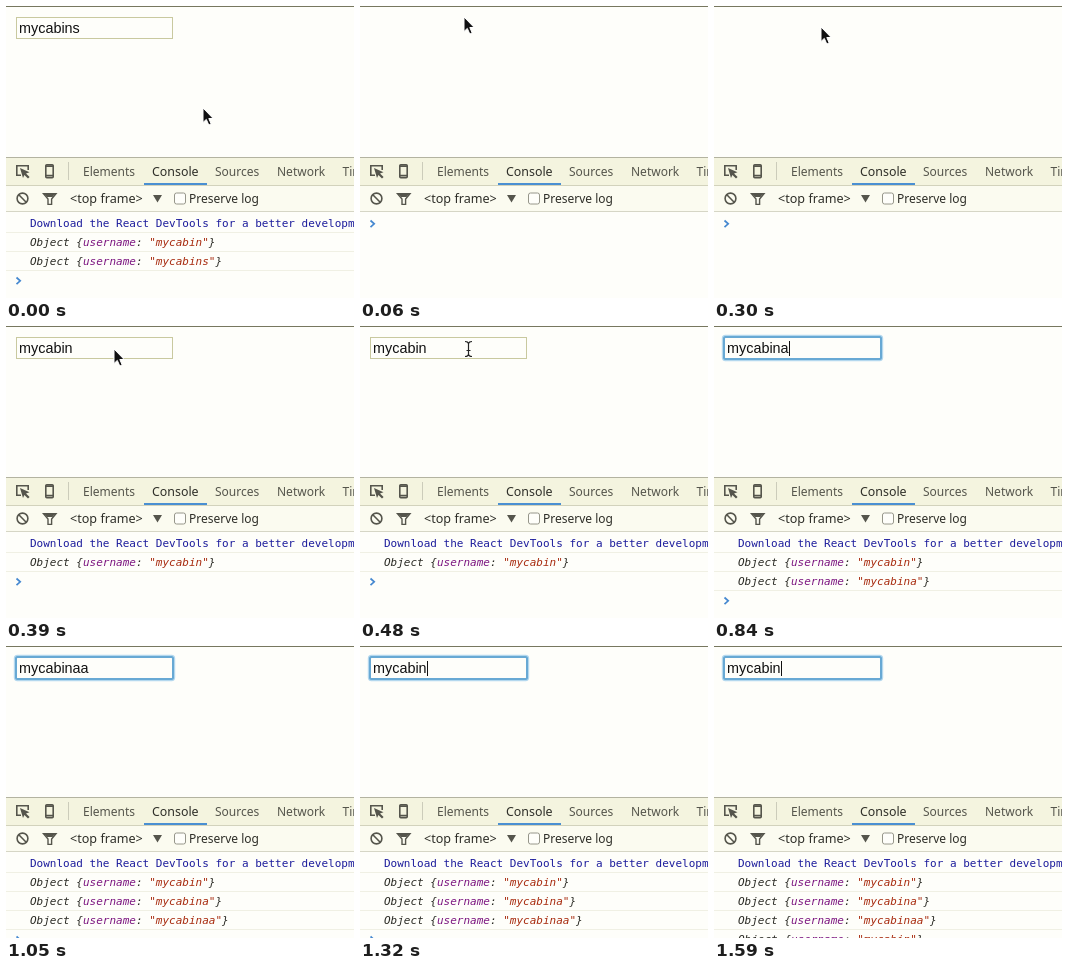
Recreate the animation shown at these times as an HTML page. Size 348 by 292 pixels, loop 1680 ms.

```html
<!DOCTYPE html>
<html lang="en">
<head>
<meta charset="utf-8">
<title>Console demo</title>
<style>
  html, body { margin: 0; width: 100%; height: 100%; overflow: hidden; background: #fefefa; }
  svg { display: block; width: 100vw; height: 100vh; }
  .ui { font: 12px "Noto Sans", "Open Sans", sans-serif; fill: #55554c; }
  .ui .dark { fill: #2e2e28; }
  .log { font: 11px "DejaVu Sans Mono", monospace; fill: #2a2a24; white-space: pre; }
  .log .notice { fill: #1c1c9c; }
  .log .entry { font-style: italic; }
  .log .key { fill: #7c1680; }
  .log .value { fill: #a82c10; }
  .field { font: 14.4px "Liberation Sans", Arial, sans-serif; fill: #111; }
  .icon { fill: none; stroke: #55554c; stroke-width: 1.6; }
  .solid { fill: #55554c; stroke: none; }
  .line { shape-rendering: crispEdges; }
</style>
</head>
<body>
<svg viewBox="0 0 348 292" xmlns="http://www.w3.org/2000/svg">
  <rect width="348" height="292" fill="#fefefa"/>
  <rect class="line" width="348" height="1" fill="#77775f"/>

  <g id="input">
    <g id="ring" fill="none">
      <rect x="9" y="10" width="159" height="24" rx="2.5" stroke="#b4d8ee" stroke-width="2.4"/>
      <rect x="10" y="11" width="157" height="22" rx="1.5" stroke="#68a9d4" stroke-width="2"/>
    </g>
    <rect id="border" x="10.5" y="11.5" width="156" height="21" fill="none" stroke="#c9c99f"/>
    <text id="value" class="field" x="13" y="27"></text>
    <rect id="caret" class="line" y="15" width="1" height="15" fill="#111"/>
  </g>

  <g class="line">
    <rect y="151" width="348" height="28" fill="#f4f4df"/>
    <rect y="179" width="348" height="26" fill="#fbfbf0"/>
    <rect y="151" width="348" height="1" fill="#b3b3a0"/>
    <rect y="179" width="348" height="1" fill="#d2d2bc"/>
    <rect y="205" width="348" height="1" fill="#d6d6c6"/>
    <rect x="62" y="156" width="1" height="18" fill="#ccccba"/>
    <rect x="138" y="177" width="63" height="2" fill="#4a8fd2"/>
  </g>

  <g class="icon">
    <path d="M15 169.2H10.8V159.8H22.2V164"/>
    <path class="solid" d="M14 162L23.5 166.2L20 167.4L23.6 171L22 172.6L18.4 169L17 172Z"/>
    <rect x="39.8" y="158.8" width="7.4" height="13" rx="1"/>
    <path d="M39.8 160.2h7.4M39.8 169.6h7.4" stroke-width="1.8"/>
    <circle cx="16.5" cy="192.5" r="5.4"/>
    <path d="M12.8 188.8L20.2 196.2"/>
    <path d="M37.5 187.8H50L45.6 193V198.4H42V193Z" stroke-width="1.4"/>
    <path class="solid" d="M38 187.5H49.5L46.5 191H41Z"/>
    <path class="solid" d="M147 189H156L151.5 196.5Z"/>
    <rect x="168.5" y="187" width="11" height="11" rx="2" fill="#fefefa" stroke="#96968a" stroke-width="1"/>
  </g>

  <g class="ui">
    <text x="77" y="170">Elements</text>
    <text class="dark" x="146" y="170" font-size="12.4" style="font-size:12.4px">Console</text>
    <text x="209" y="170">Sources</text>
    <text x="271" y="170">Network</text>
    <text x="336.5" y="170">Timeline</text>
    <text class="dark" x="64" y="197" style="font-size:12.6px">&lt;top frame&gt;</text>
    <text class="dark" x="183" y="197">Preserve log</text>
  </g>

  <g id="log" class="log"></g>
  <path id="prompt" d="M10.5 -3L14.2 0.3L10.5 3.6" fill="none" stroke="#4588d0" stroke-width="1.7"/>

  <path id="arrow" d="M0 0V14.5L3.3 11.4L5.8 17L8.2 16L5.8 10.5H10.2Z" fill="#111" stroke="#fff" stroke-width="1"/>
  <path id="beam" d="M105 15.5Q108 15.5 108.5 17.5Q109 15.5 112 15.5M108.5 17V29M105 30.5Q108 30.5 108.5 28.5Q109 30.5 112 30.5M106.5 24.5H110.5" fill="none" stroke="#222" stroke-width="1.2"/>
</svg>

<script>
const LOOP = 1680, TICK = 30, ROW = 19, NAME = "mycabin";
const $ = id => document.getElementById(id);
const show = (id, on) => $(id).setAttribute("visibility", on ? "visible" : "hidden");

// Each entry: start time, input suffix (null = blank page), logged suffixes.
const pages = [
  [0, "s", ["", "s"]],
  [60, null, []],
  [390, "", [""]],
  [840, "a", ["", "a"]],
  [960, "aa", ["", "a", "aa"]],
  [1200, "a", ["", "a", "aa"]],
  [1290, "", ["", "a", "aa"]],
  [1350, "", ["", "a", "aa", ""]]
];
const caretSpans = [[780, 1020], [1110, 1440], [1590, LOOP]];
const pointerPath = [[0, 197, 102], [60, 104, 11], [300, 107, 21], [420, 108, 23]];

function pointerAt(t) {
  const i = pointerPath.findIndex(p => p[0] > t);
  const [t0, x0, y0] = pointerPath[i - 1], [t1, x1, y1] = pointerPath[i];
  const k = (t - t0) / (t1 - t0);
  return [Math.round(x0 + (x1 - x0) * k), Math.round(y0 + (y1 - y0) * k)];
}

function logMarkup(entries) {
  if (!entries.length) return "";
  const separator = y => `<rect class="line" y="${y}" width="348" height="1" fill="#f0f0e4"/>`;
  const rows = entries.map((suffix, i) => {
    const y = 240 + i * ROW;
    return `<text class="entry" x="24" y="${y}">Object {<tspan class="key">username</tspan>: ` +
      `<tspan class="value">"${NAME + suffix}"</tspan>}</text>` + separator(y + 5);
  });
  return '<text class="notice" x="24" y="221">Download the React DevTools for a better development experience</text>' +
    separator(226) + rows.join("");
}

let current;
function setPage(page) {
  if (page === current) return;
  current = page;
  const [, suffix, entries] = page;
  $("input").style.display = suffix === null ? "none" : "";
  $("value").textContent = suffix === null ? "" : NAME + suffix;
  $("log").innerHTML = logMarkup(entries);
  const y = 217.5 + (entries.length ? entries.length + 1 : 0) * ROW;
  $("prompt").setAttribute("transform", `translate(0 ${y})`);
}

function draw(now) {
  const t = Math.floor((now % LOOP) / TICK) * TICK;
  setPage(pages.findLast(p => p[0] <= t));

  const focused = t >= 660;
  show("ring", focused);
  show("border", !focused);
  show("caret", caretSpans.some(([from, to]) => t >= from && t < to));
  $("caret").setAttribute("x", Math.round(13 + $("value").getComputedTextLength()));

  const arrow = t < 420;
  show("arrow", arrow);
  show("beam", !arrow && t < 840);
  if (arrow) $("arrow").setAttribute("transform", `translate(${pointerAt(t)})`);
}

const start = performance.now();
function tick() {
  draw(performance.now() - start);
  requestAnimationFrame(tick);
}
tick();
</script>
</body>
</html>
```
